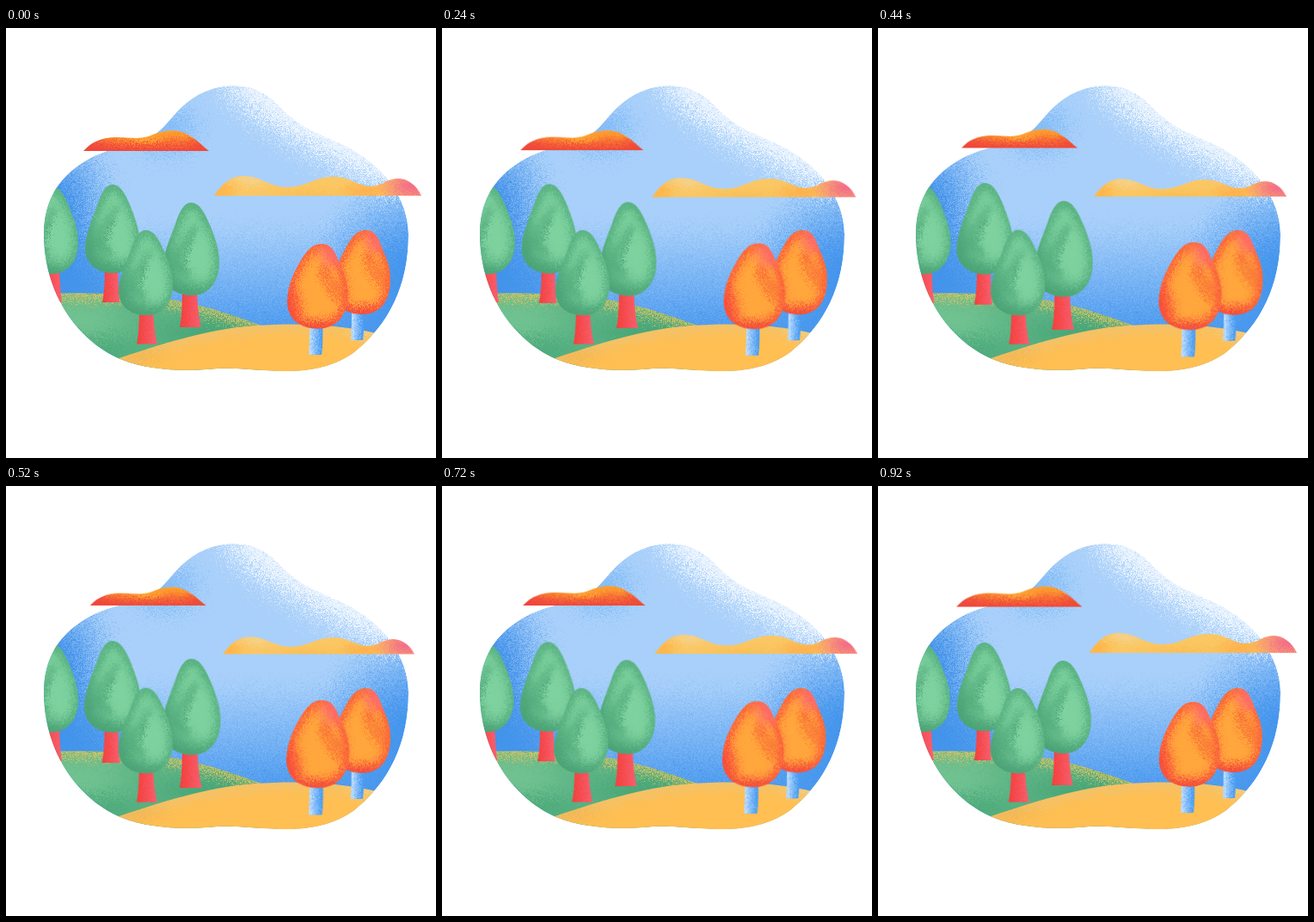
Recreate the animation shown at these times as an HTML page with a canvas. Size 500 by 500 pixels, loop 0.96 s.

```html
<!DOCTYPE html>
<html lang="en">
<head>
<meta charset="utf-8">
<title>Grainy landscape</title>
<style>
html, body { margin: 0; width: 100%; height: 100%; overflow: hidden; background: #fff; }
canvas { display: block; }
</style>
</head>
<body>
<canvas id="stage" width="500" height="500"></canvas>
<script>
const SIZE = 500, LOOP = 960, STEP = 40;
const stage = document.getElementById('stage').getContext('2d');

let seed = 7;
function random() {
  seed = (Math.imul(seed, 1664525) + 1013904223) >>> 0;
  return seed / 4294967296;
}

function newLayer() {
  const canvas = document.createElement('canvas');
  canvas.width = canvas.height = SIZE;
  return canvas.getContext('2d', { willReadFrequently: true });
}

// Grain: every pixel borrows its colour from a random neighbour.
function scatter(g, spread) {
  const image = g.getImageData(0, 0, SIZE, SIZE);
  const out = new Uint32Array(image.data.buffer);
  const smooth = out.slice();
  const offset = () => Math.round((random() + random() - 1) * spread);
  const clamp = v => Math.max(0, Math.min(SIZE - 1, v));
  for (let y = 0, i = 0; y < SIZE; y++)
    for (let x = 0; x < SIZE; x++, i++)
      out[i] = smooth[clamp(y + offset()) * SIZE + clamp(x + offset())];
  g.putImageData(image, 0, 0);
}

function glow(g, x, y, rx, ry, color, alpha = 1) {
  g.save();
  g.translate(x, y);
  g.scale(rx, ry);
  const fade = g.createRadialGradient(0, 0, 0, 0, 0, 1);
  fade.addColorStop(0, color);
  fade.addColorStop(0.35, color + 'c8');
  fade.addColorStop(1, color + '00');
  g.globalAlpha = alpha;
  g.fillStyle = fade;
  g.fillRect(-1, -1, 2, 2);
  g.restore();
}

function soft(g, path, color, width, blur) {
  g.save();
  g.filter = `blur(${blur}px)`;
  g.strokeStyle = color;
  g.lineWidth = width;
  g.lineCap = 'round';
  g.stroke(new Path2D(path));
  g.restore();
}

function ramp(g, x0, y0, x1, y1, start, end) {
  const fade = g.createLinearGradient(x0, y0, x1, y1);
  fade.addColorStop(0, start);
  fade.addColorStop(1, end);
  g.fillStyle = fade;
  g.fillRect(-SIZE, -SIZE, SIZE * 3, SIZE * 3);
}

// Paints a shaded, grained shape on top of a layer.
function paint(layer, path, base, spread, shade, place = [0, 0, 1, 1]) {
  const g = newLayer();
  g.fillStyle = base;
  g.fillRect(0, 0, SIZE, SIZE);
  g.translate(place[0], place[1]);
  g.scale(place[2], place[3]);
  shade(g);
  scatter(g, spread);
  g.globalCompositeOperation = 'destination-in';
  g.fillStyle = '#000';
  g.fill(new Path2D(path));
  layer.drawImage(g.canvas, 0, 0);
}

const ISLAND = 'M44 240C44 205 58 180 80 163C102 146 122 141 143 136C180 127 184 112 203 93' +
  'C221 76 241 67 265 67C290 67 306 78 322 95C343 117 365 123 390 135C440 158 468 200 468 240' +
  'C468 300 445 345 405 377C380 395 350 400 318 399C285 398 270 395 245 396' +
  'C215 399 170 400 133 385C80 362 44 305 44 240Z';
const BACK_CREST = 'M30 309C90 307 150 308 200 317C240 325 270 336 300 347';
const FRONT_CREST = 'M120 388C180 367 235 350 290 346C345 342 400 345 450 360';
const EGG = 'M32 0C42 0 48 12 54 26C60 42 64 52 64 66C64 88 52 103 33 103' +
  'C14 103 0 92 0 74C0 60 8 40 14 25C19 10 24 0 32 0Z';
const AUTUMN_EGG = 'M36 0C46 0 50 8 54 20C60 36 64 44 64 60C64 88 52 103 32 103' +
  'C12 103 0 90 0 70C0 50 8 32 16 17C22 6 28 0 36 0Z';
const LOW_CLOUD = 'M90 143C100 132 112 127 128 127C145 127 155 130 168 125' +
  'C185 118 200 117 213 125C224 131 229 138 236 143Z';
const LONG_CLOUD = 'M242 195C252 180 262 172 276 172C297 172 304 184 325 185' +
  'C348 186 358 173 380 173C402 173 408 184 424 184C438 184 442 175 456 175C468 175 478 184 483 195Z';

const island = new Path2D(ISLAND);
const land = newLayer();
land.clip(island);

paint(land, ISLAND, '#a9d0fa', 26, g => {
  ramp(g, 0, 225, 0, 350, '#559ff000', '#4c9aee');
  glow(g, 48, 230, 85, 140, '#2f86e6');
  glow(g, 95, 300, 100, 60, '#3c90ea', 0.8);
  glow(g, 472, 285, 115, 115, '#3f92ec');
  glow(g, 185, 118, 48, 38, '#5fa8f2', 0.6);
  soft(g, 'M275 62Q335 112 455 168', '#ffffff', 34, 13);
});
paint(land, BACK_CREST + 'V420H30Z', '#5bb384', 14, g => {
  glow(g, 85, 340, 80, 40, '#78c795', 0.8);
  glow(g, 240, 355, 90, 25, '#43a273', 0.8);
  glow(g, 105, 375, 70, 24, '#46a676', 0.7);
  soft(g, BACK_CREST, '#ffc75e', 9, 4);
});
paint(land, FRONT_CREST + 'V420H120Z', '#ffbf52', 14, g => {
  soft(g, FRONT_CREST, '#e9c47c', 10, 5);
  glow(g, 150, 380, 50, 16, '#efb250', 0.7);
  glow(g, 430, 352, 45, 14, '#f4d28c', 0.8);
});

function shadeGreen(g) {
  soft(g, EGG, '#4ca577', 9, 5);
  glow(g, 5, 78, 26, 42, '#459d72', 0.75);
  glow(g, 26, 100, 42, 22, '#479f73', 0.8);
  glow(g, 42, 58, 20, 40, '#7fd3a0', 0.8);
  soft(g, 'M36 28C30 42 16 50 17 66C18 76 26 72 30 80', '#4ea678', 5, 3);
  soft(g, 'M35 42C25 49 30 57 25 65', '#459b70', 2.5, 1.3);
  soft(g, 'M42 36C32 48 36 58 30 68', '#80d4a1', 3, 2);
}

function shadeAutumn(g) {
  soft(g, AUTUMN_EGG, '#f9483c', 9, 4);
  glow(g, 2, 80, 20, 40, '#f7453a', 0.8);
  glow(g, 32, 104, 46, 17, '#f2463a', 0.9);
  glow(g, 48, 12, 20, 24, '#ff6c70', 0.9);
  soft(g, 'M37 26C33 42 42 55 53 69C60 58 50 46 46 41Q42 36 37 26', '#f96634', 2.6, 1.6);
  soft(g, 'M41 31C38 41 51 48 49 60', '#f4593a', 2, 1);
}

function tree(left, top, width, height, trunk, autumn) {
  const g = newLayer();
  const [tl, tr, bl, br, base] = trunk;
  const y = top + height - 8;
  const stem = `M${tl} ${y}H${tr}Q${tr + 1} ${base - 14} ${br} ${base}H${bl}Q${tl} ${base - 14} ${tl} ${y}Z`;
  const [dark, light] = autumn ? ['#c4e1ff', '#4a9cf2'] : ['#f43f3c', '#f7606f'];
  paint(g, stem, dark, 5, s => ramp(s, bl, 0, br, 0, dark, light));
  paint(g, autumn ? AUTUMN_EGG : EGG, autumn ? '#ffa63c' : '#7acf9b', autumn ? 8 : 6,
    autumn ? shadeAutumn : shadeGreen, [left, top, width / 64, height / 103]);
  return g.canvas;
}

// Each tree: sprite, swelling and the centre it swells around.
const trees = [
  [tree(20, 183, 64, 103, [44, 62, 40, 65, 319]), 0.012, 58, 260],
  [tree(92, 182, 63, 103, [115, 130, 112, 132, 319]), 0.033, 118, 238],
  [tree(182, 203, 66, 108, [205, 222, 202, 227, 348]), 0.033, 201, 264],
  [tree(131, 235, 63, 99, [155, 171, 152, 176, 367.5]), 0.004, 162, 330],
  [tree(381, 235, 66, 98, [402, 416, 401, 415, 363], true), 0.006, 410, 220],
  [tree(327, 251, 70.5, 98.5, [353, 368, 352, 367, 380], true), 0.033, 350, 308]
];

const lowCloud = newLayer();
paint(lowCloud, LOW_CLOUD, '#f8703a', 7, g => {
  ramp(g, 0, 122, 0, 141, '#ffa02e', '#f0493b');
  glow(g, 98, 139, 30, 14, '#f0463c');
  glow(g, 160, 128, 32, 7, '#ffae32', 0.9);
  glow(g, 230, 137, 24, 16, '#ef4a35', 0.9);
});
const longCloud = newLayer();
paint(longCloud, LONG_CLOUD, '#fbc763', 8, g => {
  glow(g, 248, 190, 26, 18, '#ffb548');
  glow(g, 285, 176, 30, 11, '#f4d596', 0.8);
  glow(g, 350, 194, 60, 9, '#f8bc51', 0.8);
  glow(g, 418, 190, 35, 14, '#ffad48', 0.9);
  glow(g, 474, 183, 44, 26, '#f3688a');
});

const TIMES = [0, 160, 320, 440, 600, 720, 920];
const swell = [0, 0.1, 0.6, 1, 1, 0.4, 0];
// Edges of each cloud over time, with its resting box.
const clouds = [
  { sprite: lowCloud.canvas, box: [90, 236, 143, 23],
    left: [90, 89.5, 93.5, 97, 97.5, 94, 91], right: [236, 235.5, 233, 232, 233.5, 236.5, 237.5],
    base: [143, 143, 141, 139.5, 138.5, 139, 140.5], height: [23, 23, 21.5, 21, 20.5, 22, 23] },
  { sprite: longCloud.canvas, box: [242, 483, 195, 23],
    left: [242, 242, 247, 251, 252, 247.5, 245.5], right: [483, 483, 479, 475, 476.5, 483, 487],
    base: [195, 196.5, 196.5, 196, 195, 195, 194], height: [23, 23, 21.5, 20.5, 20, 22, 23] }
];

// Smooth periodic curve through the values.
function at(values, t) {
  const n = TIMES.length;
  const time = i => TIMES[(i + n) % n] + Math.floor(i / n) * LOOP;
  const value = i => values[(i + n) % n];
  const slope = i => (value(i + 1) - value(i - 1)) / (time(i + 1) - time(i - 1));
  let i = n - 1;
  while (TIMES[i] > t) i--;
  const span = time(i + 1) - time(i), u = (t - time(i)) / span, v = 1 - u;
  return v * v * (1 + 2 * u) * value(i) + u * u * (1 + 2 * v) * value(i + 1) +
    u * v * span * (v * slope(i) - u * slope(i + 1));
}

function draw(t) {
  stage.fillStyle = '#fff';
  stage.fillRect(0, 0, SIZE, SIZE);
  stage.drawImage(land.canvas, 0, 0);

  const k = at(swell, t), sway = 0.8 * Math.sin(t / LOOP * Math.PI * 2);
  stage.save();
  stage.clip(island);
  for (const [sprite, amount, x, y] of trees) {
    const s = 1 + amount * k;
    stage.save();
    stage.translate(x + sway, y);
    stage.scale(s, s);
    stage.drawImage(sprite, -x, -y);
    stage.restore();
  }
  stage.restore();

  for (const { sprite, box, left, right, base, height } of clouds) {
    const [x0, x1, y, h] = box, x = at(left, t);
    stage.save();
    stage.translate(x, at(base, t));
    stage.scale((at(right, t) - x) / (x1 - x0), at(height, t) / h);
    stage.drawImage(sprite, -x0, -y);
    stage.restore();
  }
}

function tick() {
  draw(Math.floor(performance.now() % LOOP / STEP) * STEP);
  requestAnimationFrame(tick);
}
tick();
</script>
</body>
</html>
```
